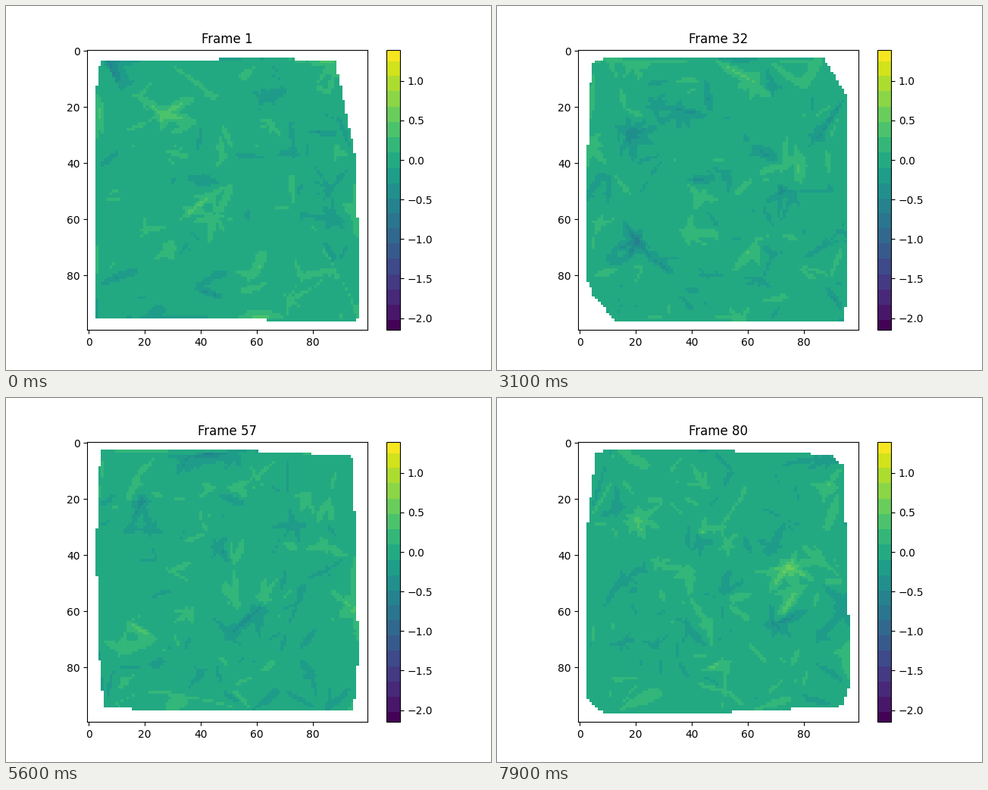
Recreate the animation shown at these times as a matplotlib script. Size 640 px wide and 480 px high, loop 8000 ms.

```python
import numpy as np
import matplotlib.pyplot as plt
from matplotlib.animation import FuncAnimation
from matplotlib.colors import ListedColormap
from matplotlib.tri import Triangulation

SIZE = 100
FRAMES = 80
VMIN, VMAX = -2.15, 1.395
STEP = 0.193    # height of one colour band
LOW, HIGH = 2.7, 96.3    # limits of the sampled region
MID = (LOW + HIGH) / 2

gx, gy = [g.ravel() for g in np.meshgrid(np.arange(SIZE), np.arange(SIZE))]


def rim_points(rng, per_side=8):
    """Points scattered close to the four sides, ordered by angle."""
    along = rng.uniform(LOW, HIGH, (4, per_side))
    depth = rng.exponential(1.0, (4, per_side))
    x = np.concatenate([along[0], along[1], LOW + depth[2], HIGH - depth[3]])
    y = np.concatenate([LOW + depth[0], HIGH - depth[1], along[2], along[3]])
    order = np.argsort(np.arctan2(y - MID, x - MID))
    return np.column_stack([x, y])[order]


def inner_points(rng, n=10, margin=9):
    """A strongly jittered n by n lattice."""
    axis = np.linspace(margin + 4, 95 - margin, n)
    x, y = np.meshgrid(axis, axis)
    lattice = np.column_stack([x.ravel(), y.ravel()])
    return lattice + rng.uniform(-4, 4, lattice.shape)


def cross(u, v):
    return u[:, 0] * v[:, 1] - u[:, 1] * v[:, 0]


def residual(n):
    """Star and streak shaped ripples on a random triangle mesh."""
    rng = np.random.default_rng(n)
    pts = np.vstack([rim_points(rng), inner_points(rng)])
    tri = Triangulation(pts[:, 0], pts[:, 1])
    found = tri.get_trifinder()(gx.astype(float), gy.astype(float))
    inside = found >= 0
    corner = tri.triangles[found[inside]]

    # barycentric weights of every grid cell
    p = np.column_stack([gx, gy])[inside]
    a, b, c = (pts[corner[:, k]] for k in range(3))
    area = cross(b - a, c - a)
    w1 = cross(p - a, c - a) / area
    w2 = cross(b - a, p - a) / area
    w = np.clip([1 - w1 - w2, w1, w2], 0, 1)

    peak = rng.laplace(0, 0.085, len(pts))
    bend = rng.laplace(0, 0.045, (len(pts), len(pts)))
    bend = bend + bend.T

    z = np.zeros(len(p))
    for k in range(3):
        j, m = (k + 1) % 3, (k + 2) % 3
        vk, vj = corner[:, k], corner[:, j]
        star = w[k] * np.clip(1 - 3 * np.minimum(w[j], w[m]), 0, 1)
        z += peak[vk] * star
        length = np.hypot(*(pts[vk] - pts[vj]).T)
        curve = bend[vk, vj] * np.clip(length / 10, 0, 1.6)
        z += 4 * w[k] * w[j] * np.clip(1 - 2.5 * w[m], 0, 1) * curve

    field = np.full(SIZE * SIZE, np.nan)
    field[inside] = z
    return field.reshape(SIZE, SIZE)


levels = np.round(np.linspace(VMIN, VMAX, 256) / STEP) * STEP
bands = ListedColormap(plt.get_cmap("viridis")((levels - VMIN) / (VMAX - VMIN)))

fig, ax = plt.subplots(figsize=(6.4, 4.8), dpi=100)
image = ax.imshow(residual(0), cmap=bands, vmin=VMIN, vmax=VMAX)
fig.colorbar(image, ax=ax)
title = ax.set_title("Frame 1")


def update(n):
    image.set_data(residual(n))
    title.set_text(f"Frame {n + 1}")
    return image, title


anim = FuncAnimation(fig, update, frames=FRAMES, interval=100, repeat=True,
                     repeat_delay=0)
plt.show()
```
